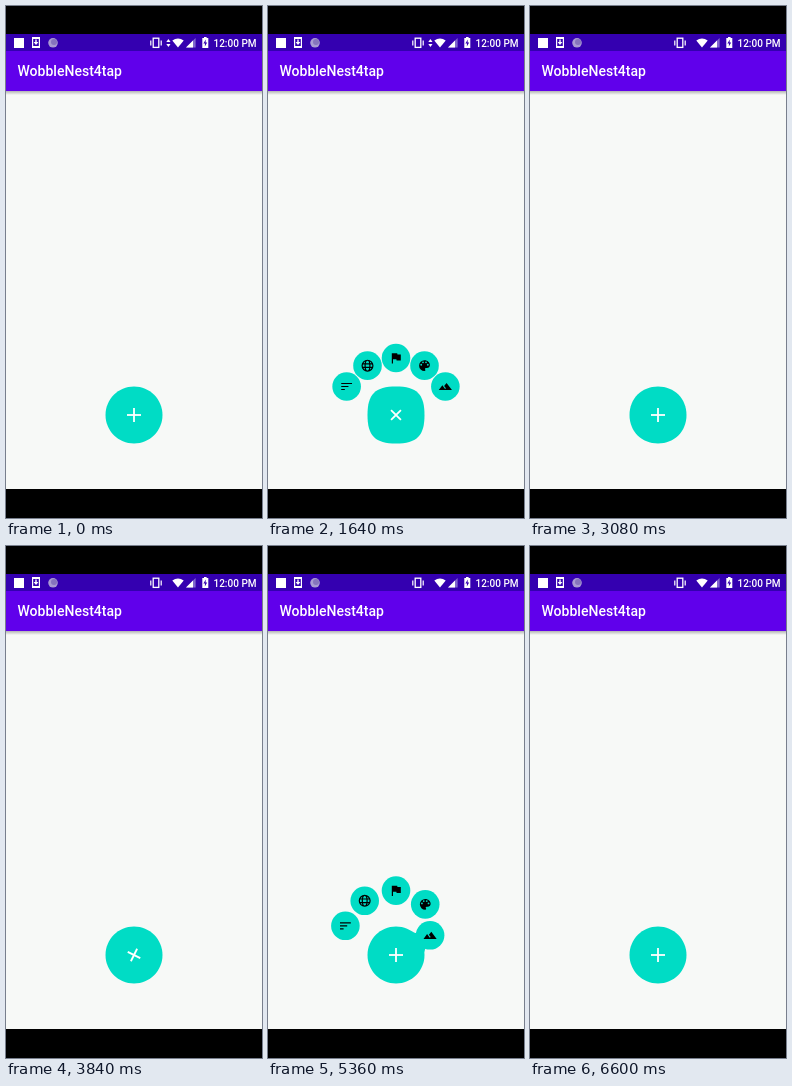
An HTML page with a canvas for the animation above (7.16 s loop, 256 px wide and 512 px high).

```html
<!DOCTYPE html>
<html lang="en">
<head>
<meta charset="utf-8">
<title>Radial menu</title>
<style>
  html, body { margin: 0; width: 100%; height: 100%; overflow: hidden; background: #000; }
  canvas { display: block; width: 256px; height: 512px; }
</style>
</head>
<body>
<canvas id="stage" width="256" height="512"></canvas>
<script>
const ctx = document.getElementById('stage').getContext('2d');
const LOOP = 7160, STEP = 40;
const TEAL = '#00dcc5', PAGE = '#f7f9f7', STATUS = '#3400b0', BAR = '#6000eb';
const HUB = { x: 128, y: 409, r: 28.5 };
const ITEM_R = 14.3, REACH = 57;
const OPEN = { delay: 140, time: 350, stagger: 60 };
const CLOSE = { time: 500, stagger: 87 };

// Each cycle opens, then closes; the closing pauses for a moment at `hold`.
const cycles = [
  { open: 620, close: 1934, hold: 2000, pause: 80 },
  { open: 3700, close: 4790, hold: 5000, pause: 160 }
];

const clamp = v => Math.min(1, Math.max(0, v));
const smooth = v => (1 - Math.cos(Math.PI * clamp(v))) / 2;
const anticipate = v => v * v * (3 * v - 2);
const overshoot = v => 1 + (v - 1) ** 2 * (3 * (v - 1) + 2);

function pose(t) {
  const c = t >= cycles[1].open ? cycles[1] : cycles[0];
  if (t < c.open) return { turn: 0, squish: 0, reach: () => 0 };
  if (t < c.close) {
    const e = t - c.open;
    return {
      turn: smooth(e / 250),
      squish: smooth((e - 560) / 200),
      reach: i => overshoot(clamp((e - OPEN.delay - i * OPEN.stagger) / OPEN.time))
    };
  }
  const now = t < c.hold ? t : Math.max(c.hold, t - c.pause);
  const e = now - c.close, x = e - 450;
  const wobble = x > 0 && x < 1200 ? 0.6 * Math.sin(Math.PI * x / 500) ** 2 * (1 - x / 1200) : 0;
  return {
    turn: 1 - smooth(e / 250),
    squish: 1 - smooth(e / 350) + wobble,
    reach: i => 1 - anticipate(clamp((e - (4 - i) * CLOSE.stagger) / CLOSE.time))
  };
}

function disc(x, y, r, color) {
  ctx.fillStyle = color;
  ctx.beginPath();
  ctx.arc(x, y, r, 0, 2 * Math.PI);
  ctx.fill();
}

function rect(x, y, w, h, color) {
  ctx.fillStyle = color;
  ctx.fillRect(x, y, w, h);
}

function shape(points, color) {
  ctx.fillStyle = color;
  ctx.beginPath();
  points.forEach(([x, y]) => ctx.lineTo(x, y));
  ctx.fill();
}

function label(text, x, y, size) {
  ctx.font = `500 ${size}px Roboto, sans-serif`;
  ctx.fillStyle = '#fff';
  ctx.fillText(text, x, y);
}

// Icons live on a 24 unit grid.
const fillPath = d => { const path = new Path2D(d); return () => ctx.fill(path); };
const paletteBody = fillPath('M12 3a9 9 0 0 0 0 18c1.5 0 2-1.5 1.1-2.5-.9-1 0-2.5 1.2-2.5H16c2.8 0 5-2.2 5-5 0-4.4-4-8-9-8z');
const icons = [
  fillPath('M3 18h6v-2H3zM3 6v2h18V6zM3 13h12v-2H3z'),
  () => {
    ctx.lineWidth = 2;
    ctx.beginPath();
    ctx.arc(12, 12, 9, 0, 7);
    ctx.moveTo(16, 12);
    ctx.ellipse(12, 12, 4, 9, 0, 0, 7);
    for (const y of [9, 15]) { ctx.moveTo(4, y); ctx.lineTo(20, y); }
    ctx.stroke();
  },
  fillPath('M14.4 6L14 4H5v17h2v-7h5.6l.4 2h7V6z'),
  () => {
    paletteBody();
    for (const [x, y] of [[6.5, 10.5], [9.5, 6.5], [14.5, 6.5], [17.5, 10.5]]) disc(x, y, 1.5, TEAL);
  },
  fillPath('M14 6l-4 5 3 4-1.5 1.2L7 10l-6 8h22z')
];

function neck(angle, dist) {
  const half = 0.42;
  ctx.save();
  ctx.translate(HUB.x, HUB.y);
  ctx.rotate(angle);
  const mx = HUB.r * Math.cos(half), my = HUB.r * Math.sin(half);
  const waist = 11 * clamp((43 - dist) / 14);
  const cx = (mx + dist) / 2;
  ctx.fillStyle = TEAL;
  ctx.beginPath();
  ctx.moveTo(mx, -my);
  ctx.quadraticCurveTo(cx, -waist, dist, -ITEM_R * 0.8);
  ctx.lineTo(dist, ITEM_R * 0.8);
  ctx.quadraticCurveTo(cx, waist, mx, my);
  ctx.fill();
  ctx.restore();
}

function drawItem(i, amount) {
  const dist = REACH * amount;
  if (dist < 1) return;
  const angle = -Math.PI * (5 - i) / 6;
  const x = HUB.x + dist * Math.cos(angle), y = HUB.y + dist * Math.sin(angle);
  if (dist > 26 && dist < 43) neck(angle, dist);
  disc(x, y, ITEM_R, TEAL);
  ctx.save();
  ctx.translate(x, y);
  ctx.scale(0.6, 0.6);
  ctx.translate(-12, -12);
  ctx.fillStyle = ctx.strokeStyle = '#000';
  icons[i]();
  ctx.restore();
}

function drawHub(turn, squish) {
  const r = HUB.r, k = r * (0.5523 + 0.18 * squish);
  ctx.save();
  ctx.translate(HUB.x, HUB.y);
  ctx.fillStyle = TEAL;
  ctx.beginPath();
  ctx.moveTo(r, 0);
  ctx.bezierCurveTo(r, k, k, r, 0, r);
  ctx.bezierCurveTo(-k, r, -r, k, -r, 0);
  ctx.bezierCurveTo(-r, -k, -k, -r, 0, -r);
  ctx.bezierCurveTo(k, -r, r, -k, r, 0);
  ctx.fill();
  ctx.rotate(turn * Math.PI / 4);
  rect(-7, -0.9, 14, 1.8, '#fff');
  rect(-0.9, -7, 1.8, 14, '#fff');
  ctx.restore();
}

function drawStatus(t) {
  const white = '#fff';
  rect(8, 32, 10, 10, white);

  rect(26, 31, 8, 11, white);
  rect(27.2, 33, 5.6, 7, STATUS);
  rect(29.3, 33.5, 1.4, 3, white);
  shape([[27.6, 36], [32.4, 36], [30, 39]], white);

  disc(47, 36.8, 4.8, '#a99bd2');
  disc(48, 36, 3, '#8674bd');

  ctx.strokeStyle = white;
  ctx.lineWidth = 1.3;
  ctx.strokeRect(147.2, 32.2, 5.6, 9.2);
  for (const x of [144.2, 154.6]) rect(x, 34.5, 1.2, 5, white);

  if (t < 2120) {
    shape([[160.3, 36], [162.4, 33], [164.5, 36]], white);
    shape([[160.3, 38], [162.4, 41], [164.5, 38]], white);
  }

  ctx.fillStyle = white;
  ctx.beginPath();
  ctx.moveTo(172, 41.5);
  ctx.lineTo(166.3, 34.5);
  ctx.quadraticCurveTo(172, 30.5, 177.7, 34.5);
  ctx.fill();
  shape([[180, 41.5], [189.6, 41.5], [189.6, 32]], '#8066ce');
  shape([[180, 41.5], [187, 41.5], [187, 34.6]], white);

  rect(198, 31, 2.6, 2, white);
  rect(196.3, 32, 6, 10, white);
  shape([[199.8, 33.5], [197.4, 37.6], [199, 37.6], [198.8, 40.5], [201.2, 36.4], [199.6, 36.4]], STATUS);

  label('12:00 PM', 207.5, 40.6, 10);
}

function drawScreen(t) {
  rect(0, 0, 256, 512, '#000');
  rect(0, 28, 256, 17, STATUS);
  rect(0, 85, 256, 398, PAGE);
  const shade = ctx.createLinearGradient(0, 85, 0, 89);
  shade.addColorStop(0, 'rgba(0,0,0,.28)');
  shade.addColorStop(1, 'rgba(0,0,0,0)');
  rect(0, 85, 256, 4, shade);
  rect(0, 45, 256, 40, BAR);
  drawStatus(t);
  label('WobbleNest4tap', 11.5, 70, 14);
}

function render(t) {
  const { turn, squish, reach } = pose(t);
  drawScreen(t);
  for (let i = 0; i < 5; i++) drawItem(i, reach(i));
  drawHub(turn, squish);
}

const begin = performance.now();
function tick() {
  const t = (performance.now() - begin) % LOOP;
  render(Math.floor(t / STEP) * STEP);
  requestAnimationFrame(tick);
}
tick();
</script>
</body>
</html>
```
